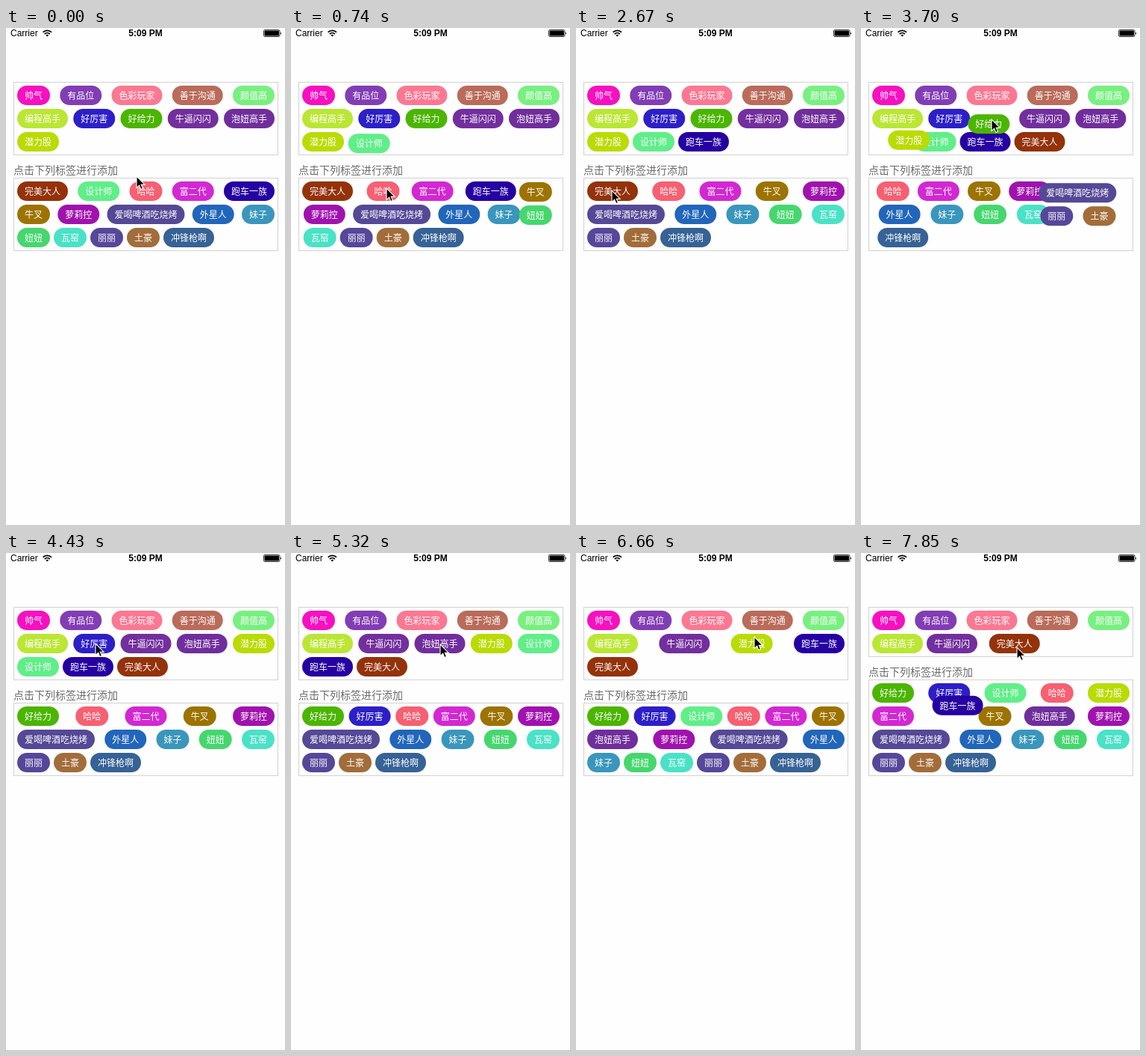
An HTML page that plays this animation: 374 by 664 pixels, repeating every 8000 ms.

```html
<!DOCTYPE html>
<html lang="zh">
<head>
<meta charset="utf-8">
<title>标签选择</title>
<style>
html, body { margin: 0; width: 100%; height: 100%; overflow: hidden; background: #fefefe; }
body { position: relative; }
body > * { position: absolute; left: 0; top: 0; }
.status { font: 12px/14px "Liberation Sans", Arial, sans-serif; color: #000; white-space: pre; }
.box { left: 10px; width: 355px; box-sizing: border-box; border: 1px solid #d2d2d2; }
.hint, .tag { font-family: "Noto Sans CJK SC", "Noto Sans CJK", sans-serif; white-space: nowrap; }
.hint { left: 10px; font-size: 14px; line-height: 20px; color: #6b6b6b; }
.tag { height: 26px; border-radius: 13px; font-size: 12px; line-height: 25px; color: #fff; text-align: center; }
svg { overflow: visible; }
#cursor { z-index: 200; }
</style>
</head>
<body>
<div class="status" style="left:6px">Carrier</div>
<div class="status" style="left:0;width:374px;text-align:center;font-weight:bold">5:09 PM</div>
<svg width="374" height="16">
  <g fill="none" stroke="#000" stroke-width="1.8">
    <path d="M49.6 5.7a8.1 8.1 0 0 1 11.4 0M51.8 8a5 5 0 0 1 7 0"/>
  </g>
  <path d="M53.4 9.6a2.7 2.7 0 0 1 3.8 0L55.3 11.6Z"/>
  <rect x="345.5" y="2.5" width="21.5" height="9" rx="1.6" fill="none" stroke="#000" stroke-width=".8"/>
  <rect x="346.6" y="3.6" width="19.3" height="6.8" rx=".6"/>
  <path d="M368 5.4a1.8 1.8 0 0 1 0 3.2Z"/>
</svg>
<div class="box" id="upper"></div>
<div class="hint" id="hint">点击下列标签进行添加</div>
<div class="box" id="lower"></div>
<svg id="cursor" width="12" height="18">
  <path d="M0 0V15.6L3.6 12.3 5.9 17.6 8.5 16.5 6.2 11.4H11.2Z" stroke="#fff" stroke-width="1.1"/>
</svg>
<script>
const LOOP = 8000, DURATION = 300;
const LEFT = 15, WIDTH = 345, GAP = 5, HEIGHT = 26, TOP = 72;

const COLORS = {
  帅气: '#f610c0', 有品位: '#823db5', 色彩玩家: '#fb7893', 善于沟通: '#ba6b5a',
  颜值高: '#78f080', 编程高手: '#bbe633', 牛逼闪闪: '#722f9d',
  好给力: '#4bb500', 好厉害: '#2d1fc8', 完美大人: '#94320a', 设计师: '#60ee89',
  哈哈: '#f66072', 潜力股: '#badb04', 富二代: '#d228d2', 跑车一族: '#2600a2',
  牛叉: '#9d7300', 泡妞高手: '#702e9c', 萝莉控: '#a012ae', 爱喝啤酒吃烧烤: '#554896',
  外星人: '#2166ba', 妹子: '#3a96bc', 妞妞: '#45d76e', 瓦窑: '#4ae2c6',
  丽丽: '#56479a', 土豪: '#a26d3a', 冲锋枪啊: '#366296'
};
const NAMES = Object.keys(COLORS);
const FIRST = '帅气 有品位 色彩玩家 善于沟通 颜值高 编程高手 好厉害 好给力 牛逼闪闪 泡妞高手 潜力股'.split(' ');

// Taps: time and the tag that changes box
const TAPS = [
  [480, '设计师'], [1230, '跑车一族'], [2740, '完美大人'], [3644, '好给力'], [4640, '好厉害'],
  [5400, '泡妞高手'], [6340, '设计师'], [6950, '潜力股'], [7631, '跑车一族']
];
// Pointer stops: time, x, y
const STOPS = [
  [0, 175, 198], [100, 175, 198], [420, 128, 214], [750, 128, 214], [1190, 243, 208],
  [1600, 243, 208], [2500, 48, 217], [2960, 48, 217], [3580, 175, 122], [3800, 175, 122],
  [4420, 120, 121], [4900, 120, 121], [5290, 200, 122], [5780, 200, 122], [6280, 239, 112],
  [6680, 239, 112], [6800, 237, 117], [7120, 237, 117], [7400, 209, 126], [LOOP, 209, 126]
];

const byId = id => document.getElementById(id);
const mix = (a, b, p) => a + (b - a) * p;
const widthOf = name => name.length * 12 + 20;
const move = (el, x, y) => { el.style.transform = `translate(${x}px, ${y}px)`; };

// Cubic ease-in-out (.42, 0, .58, 1)
function ease(x) {
  if (x <= 0) return 0;
  if (x >= 1) return 1;
  let lo = 0, hi = 1, s;
  for (let i = 0; i < 24; i++) {
    s = (lo + hi) / 2;
    const at = 1.26 * s * (1 - s) ** 2 + 1.74 * s * s * (1 - s) + s ** 3;
    if (at < x) lo = s; else hi = s;
  }
  return s * s * (3 - 2 * s);
}

// Wrap into rows; every row but the last is justified
function flow(names, top, spots) {
  const rows = [[]];
  let used = -GAP;
  for (const name of names) {
    const need = widthOf(name) + GAP;
    if (used + need > WIDTH) { rows.push([]); used = -GAP; }
    rows[rows.length - 1].push(name);
    used += need;
  }
  rows.forEach((row, i) => {
    const free = WIDTH - row.reduce((sum, n) => sum + widthOf(n), 0);
    const gap = i < rows.length - 1 ? free / (row.length - 1) : GAP;
    let x = LEFT;
    for (const name of row) {
      spots[name] = [x, top + GAP + i * (HEIGHT + GAP)];
      x += widthOf(name) + gap;
    }
  });
  return rows.length * (HEIGHT + GAP) + GAP;
}

function layout(chosen) {
  const spots = {};
  const upper = flow(chosen, TOP, spots);
  const y = TOP + upper + 30;
  const lower = flow(NAMES.filter(n => !chosen.includes(n)), y, spots);
  return { spots, upper, y, lower };
}

let chosen = FIRST;
const layouts = [layout(chosen)];
for (const [, name] of TAPS) {
  chosen = chosen.includes(name) ? chosen.filter(n => n !== name) : [...chosen, name];
  layouts.push(layout(chosen));
}

const tags = NAMES.map(name => {
  const el = document.createElement('div');
  el.className = 'tag';
  el.textContent = name;
  el.style.width = widthOf(name) + 'px';
  el.style.background = COLORS[name];
  document.body.appendChild(el);
  return { name, el };
});
const upper = byId('upper'), lower = byId('lower'), hint = byId('hint'), cursor = byId('cursor');
move(upper, 0, TOP);

function draw(t) {
  const count = TAPS.filter(tap => tap[0] <= t).length;
  const [start, active] = count ? TAPS[count - 1] : [0, ''];
  const p = count ? ease((t - start) / DURATION) : 1;
  const to = layouts[count], from = layouts[Math.max(0, count - 1)];

  tags.forEach(({ name, el }, i) => {
    const a = from.spots[name], b = to.spots[name];
    move(el, mix(a[0], b[0], p), mix(a[1], b[1], p));
    el.style.zIndex = name === active ? 100 : i + 1;
  });
  const y = mix(from.y, to.y, p);
  upper.style.height = mix(from.upper, to.upper, p) + 'px';
  lower.style.height = to.lower + 'px';
  move(lower, 0, y);
  move(hint, 0, y - 21.5);

  const k = STOPS.findIndex(stop => stop[0] > t);
  const a = STOPS[k - 1], b = STOPS[k];
  const q = ease((t - a[0]) / (b[0] - a[0]));
  move(cursor, mix(a[1], b[1], q), mix(a[2], b[2], q));
}

function tick() {
  draw(performance.now() % LOOP);
  requestAnimationFrame(tick);
}
tick();
</script>
</body>
</html>
```
